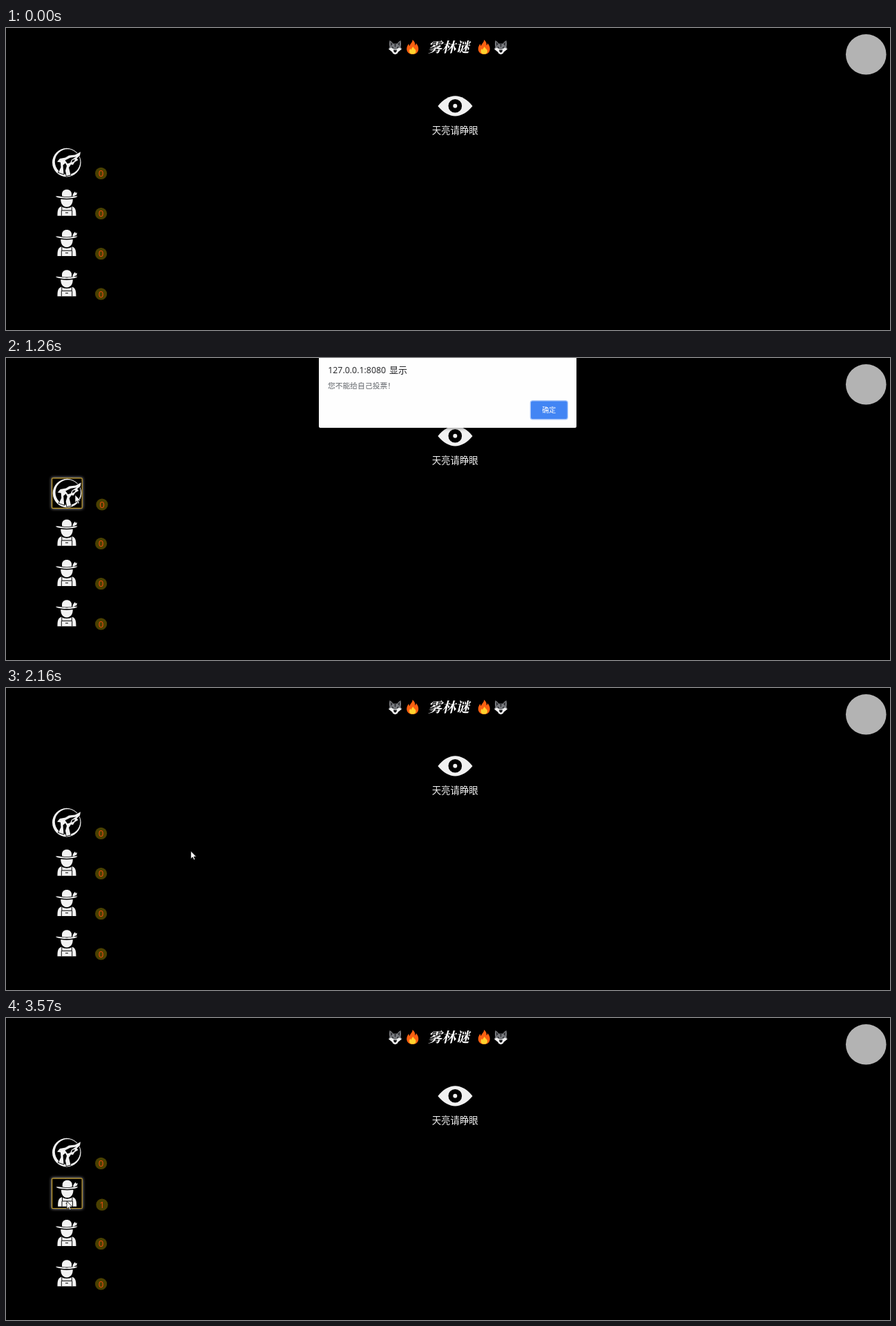
An HTML page that plays this animation: 1280x437 px, repeating every 3600 ms.

```html
<!DOCTYPE html>
<html lang="zh">
<head>
<meta charset="utf-8">
<title>投票</title>
<style>
  html, body { margin: 0; width: 100%; height: 100%; overflow: hidden; background: #000; }
  svg { display: block; position: absolute; left: 0; top: 0; overflow: visible; }
  text { font-family: "Open Sans", "Noto Sans CJK SC", "Noto Sans CJK", sans-serif; }
  .title { font: italic bold 20px "Noto Serif CJK SC", "Noto Sans CJK SC", "Noto Sans CJK", serif; }
  .frame { fill: #000; stroke: #c09a2a; stroke-width: 1.2; filter: drop-shadow(0 0 2px #b8b8c6); }
  #dialog {
    position: absolute; left: 453.3px; top: -8px; width: 373.2px; height: 109px;
    background: #fefefe; border-radius: 2px; box-shadow: 0 1px 5px rgba(0, 0, 0, .45);
    transform-origin: 50% 45%;
  }
</style>
</head>
<body>
<svg width="1280" height="437" viewBox="0 0 1280 437">
  <defs>
    <symbol id="wolf" overflow="visible">
      <path fill="#77797d" d="M2 .4C4.400 1.400 5.800 3.200 6.800 5h6.400C14.200 3.200 15.600 1.400 18 .4c.8 3.600.7 6.700 0 9.200L19.400 13l-4.900 4L10 20.500 5.500 17 .6 13 2 9.600C1.300 7.100 1.200 4 2 .4z"/>
      <path fill="#2b2c30" d="M3.300 2.600l2.700 3.200-2.200 3zM16.700 2.600L14 5.800l2.200 3zM9 5h2l-.4 5H9.400z"/>
      <path fill="#f3f3f3" d="M.6 13l3.400-2L8.600 13.500h2.800L16 11l3.400 2-4.900 4-1.500 2.500-3 1.200-3-1.200L5.500 17z"/>
      <path fill="#101114" d="M4.500 9.300l3 1.200-.6 1.400zM15.500 9.300l-3 1.200.6 1.400zM7.400 14.200h5.200L11.800 17 10 18.200 8.200 17z"/>
    </symbol>
    <symbol id="fire" overflow="visible">
      <path fill="#fb6011" d="M8.600 0c3.300 2.700 4 5.300 3.600 8 1-.7 1.500-1.800 1.600-3 2.300 2.600 3.400 5.200 3.400 8.200 0 5-3.600 7.800-8.500 7.800S.2 18 .2 13.200C.2 10 1.800 7.700 3.200 5.700c.1 1.500.5 2.600 1.300 3.300C5 5.500 8.800 4.200 8.600 0z"/>
      <path fill="#ffd22e" d="M9.300 9.600c.2 2.800 4.200 3.900 4.200 7.200 0 2.500-1.800 4-4.700 4s-4.800-1.500-4.800-4c0-1.700.7-3 1.700-4 .2 1 .6 1.600 1.100 2 0-2.300 2-3.100 2.500-5.200z"/>
    </symbol>
    <symbol id="pack" overflow="visible">
      <path fill="#f1f1f1" fill-rule="evenodd" d="M1 21a20.800 20.800 0 1 0 41.600 0a20.800 20.800 0 1 0-41.600 0zM4.800 20a18.300 18.300 0 1 1 36.600 0a18.300 18.300 0 1 1-36.600 0z"/>
      <path fill="#f1f1f1" stroke="#000" stroke-width="1.600" paint-order="stroke" d="M8 20L12 15.500 20 14 25 11 34 9.800 42 5.600 41 11 36.500 15 38.500 17.500 33.500 20.500 31 24.500 28 24 25 28.500 27.500 39 21.500 40.500 20 33 22 26 20 22 16.500 25 17.500 38 10 35.500 13.500 28 13 21z"/>
      <path d="M19.500 18l7.500-3.800 8.500-1.200-6.500 4-2 4.500-4 1.200zM30 17.500l4-1-1.500 3-3.500 1.500z"/>
    </symbol>
    <symbol id="farmer" overflow="visible">
      <g fill="#f3f3f3">
        <path d="M15 11.500V8.500C15 4.500 18 2 22 2s7 2.500 7 6.500v3q-7 1.800-14 0z"/>
        <path d="M5.800 11.600Q10 11.200 15 12.400q7 1.600 14 0 5-1.200 8.600-.8-2 2-7.600 2.700-8 1.200-16 0-6-.7-8.200-2.700z"/>
        <path d="M30 11.200l1.500-3.500L34 4.800l.6 2 2.600-.3-1 2.200.8.6-3 1.200-1.800 1.300z"/>
        <path d="M13.300 15.800q8.700 1.400 17.400 0c.4 6.400-3.200 11.500-8.700 11.500s-9.100-5.100-8.700-11.500z"/>
        <path d="M8.500 40c0-8 .7-11.500 5.500-13.500q3.400 2.400 8 2.400t8-2.400c4.800 2 5.500 5.500 5.500 13.500z"/>
      </g>
      <path fill="none" stroke="#000" d="M14.800 26.500v5.700h14.400v-5.700M14.300 40v-7.800M29.700 40v-7.800M20 35.500h4"/>
    </symbol>
  </defs>

  <circle cx="1245.3" cy="38.3" r="29.300" fill="#b3b3b3"/>
  <use href="#wolf" x="553.5" y="17.5"/>
  <use href="#fire" x="580" y="17"/>
  <text class="title" x="641" y="35" fill="#fff" text-anchor="middle">雾林谜</text>
  <use href="#fire" x="683.5" y="17"/>
  <use href="#wolf" x="706.5" y="17.5"/>

  <path fill="#f1f1f1" d="M625.300 113C633 103 642 98.200 650.400 98.200S668 103 675.500 113C668 122.500 659 127.400 650.400 127.400S633 122.500 625.300 113z"/>
  <circle cx="650.3" cy="112.8" r="9.8"/>
  <circle cx="650.3" cy="112.8" r="3" fill="#f1f1f1"/>
  <text x="650.2" y="153.3" font-size="13.4" fill="#f4f4f4" text-anchor="middle">天亮请睁眼</text>
  <g id="rows"></g>
</svg>

<div id="dialog">
  <svg width="373" height="109" viewBox="453.3 -8 373.2 109">
    <text x="466.5" y="21.8" font-size="12.4" fill="#202124">127.0.0.1:8080</text>
    <text x="555.3" y="21.8" font-size="13" fill="#202124">显示</text>
    <text x="466.3" y="44.2" font-size="10.8" fill="#5f6368">您不能给自己投票！</text>
    <rect x="759.8" y="61.8" width="54" height="27" rx="3" fill="#4285f4" stroke="#a9c8fb" stroke-width="1.3"/>
    <text x="786.8" y="79" font-size="10" font-weight="500" fill="#fff" text-anchor="middle">确定</text>
  </svg>
</div>

<svg width="1280" height="437" viewBox="0 0 1280 437">
  <path id="cursor" fill="#fff" stroke="#111" stroke-width=".8" d="M0 0V11.300L2.600 8.900 4.400 12.900 6.200 12.100 4.500 8.200H8z"/>
</svg>

<script>
const LOOP = 3600, STEP = 30, ROW = 58.2, TOP = 173.6;
const $ = id => document.getElementById(id);

const ease = {
  lin: s => s,
  both: s => s * s * (3 - 2 * s),
  in: s => s ** 1.4,
  out: s => 1 - (1 - s) ** 2
};

// time, x, y, easing towards the point
const path = [
  [150, 1088, 25], [630, 86, 198, 'both'],
  [1230, 86, 198], [1260, 100, 198], [1770, 795, 74, 'both'],
  [1890, 795, 74], [1950, 668, 140, 'in'], [2250, 96, 277, 'out'],
  [2310, 91, 267], [2370, 91, 263],
  [2940, 91, 263], [3210, 95, 309, 'both'], [3480, 87, 258, 'both'],
  [3540, 87, 258], [3570, 88, 265]
];

// time, opacity, vertical shift, tilt in degrees
const popup = [
  [960, 0, -14, 10], [990, .25, -12, 9], [1020, .6, -7, 5], [1050, .9, -2, 2], [1080, 1, 0, 0],
  [1860, 1, 0, 0], [1890, 1, -1.2, .5], [1920, .8, -5, 4], [1950, .47, -9.7, 7], [1980, .16, -13, 10], [2010, 0, -15, 11]
];

function sample(table, t) {
  if (t <= table[0][0]) return table[0].slice(1);
  const i = table.findIndex(k => k[0] >= t);
  if (i < 0) return table[table.length - 1].slice(1);
  const a = table[i - 1], b = table[i];
  const f = ease[b[4]] || ease.lin;
  const s = f((t - a[0]) / (b[0] - a[0]));
  return a.slice(1, 4).map((v, n) => typeof v === 'number' ? v + (b[n + 1] - v) * s : v);
}

$('rows').innerHTML = ['pack', 'farmer', 'farmer', 'farmer'].map((icon, i) => `
  <g transform="translate(66 ${TOP + i * ROW})">
    <rect class="frame" x=".6" y=".3" width="43.6" height="43.4" rx="1"/>
    <use href="#${icon}"/>
    <g class="badge">
      <circle cx="71.6" cy="36.7" r="8.6" fill="#4a4000"/>
      <text x="71.6" y="41.4" font-size="13.4" fill="#e84c10" text-anchor="middle">0</text>
    </g>
  </g>`).join('');

const rows = [...$('rows').children].map(g => ({
  frame: g.querySelector('rect'),
  icon: g.querySelector('use'),
  badge: g.querySelector('.badge'),
  count: g.querySelector('text')
}));

function hoveredRow(t, x, y) {
  if (t >= 990 && t < 1890) return 0;
  if (t < 150 || x < 66 || x > 110) return -1;
  const i = Math.floor((y - TOP) / ROW);
  return y - TOP - i * ROW <= 44 ? i : -1;
}

function draw(t) {
  const [x, y] = sample(path, t);
  $('cursor').setAttribute('transform', `translate(${x} ${y})`);
  $('cursor').style.display = t < 150 ? 'none' : '';

  const [alpha, shift, tilt] = sample(popup, t);
  $('dialog').style.opacity = alpha;
  $('dialog').style.transform = tilt
    ? `translateY(${shift}px) perspective(1000px) rotateX(${tilt}deg)` : 'none';

  const active = hoveredRow(t, x, y);
  rows.forEach((row, i) => {
    const on = i === active;
    row.frame.style.display = on ? '' : 'none';
    row.icon.setAttribute('transform', on ? 'translate(.7 1)' : '');
    row.badge.setAttribute('transform', on ? 'translate(1.4 1.7)' : '');
    row.count.textContent = i === 1 && t >= 2640 ? 1 : 0;
  });
}

function tick() {
  const t = performance.now() % LOOP;
  draw(Math.floor(t / STEP) * STEP);
  requestAnimationFrame(tick);
}
tick();
</script>
</body>
</html>
```
